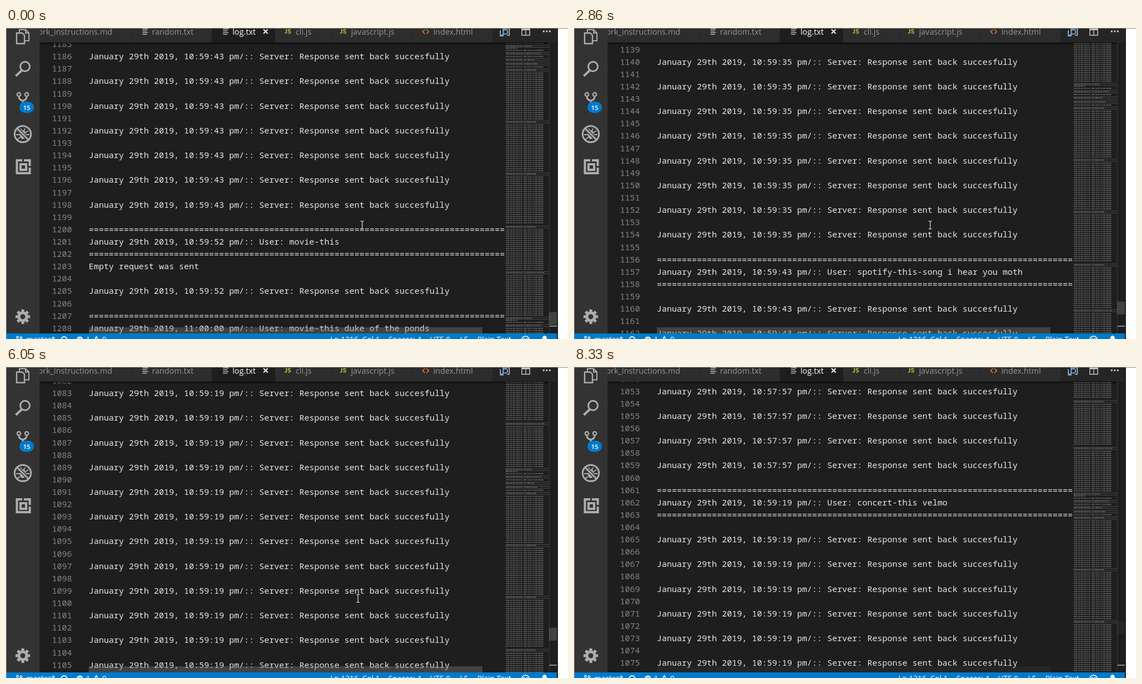
Write an HTML page with a canvas that moves like this. It is 1005 px wide and 557 px high and loops after 8.55 s.

```html
<!DOCTYPE html>
<html>
<head>
<meta charset="utf-8">
<style>
  html, body { margin: 0; width: 100%; height: 100%; overflow: hidden; background: #fff; }
  canvas { display: block; }
</style>
</head>
<body>
<canvas id="stage" width="1005" height="557"></canvas>
<script>
const ctx = document.getElementById('stage').getContext('2d');
const LOOP = 8550, LINE = 22.12, CHAR_MAP = 0.93, MAP_LINE = 1.86, LAST_LINE = 1216;
const NOTCH = 3.3165; // lines per wheel notch
const MONO = '14.95px "Noto Sans Mono", monospace';
const UI = '14.3px "Open Sans", sans-serif';
const ICON = '#adadad';

// [time, wheel notches scrolled so far]
const scrollTrack = [
  [0, 0], [280, 1], [480, 2], [680, 3], [950, 4], [1070, 6],
  [1350, 7], [1560, 8], [1770, 9], [2300, 12], [2860, 14],
  [3880, 17], [4000, 19], [4280, 21], [4560, 23], [4840, 25],
  [5400, 27], [5650, 29], [6050, 31], [6200, 33], [6390, 35],
  [6590, 36], [6780, 38], [6970, 39], [7120, 40]
];
// [time, pointer x, pointer y, shape]
const pointerTrack = [
  [0, 637, 353, 'beam'], [3260, 633, 384, 'beam'], [3380, 629.5, 414.5, 'beam'],
  [7550, 629, 448, 'beam'], [7680, 629, 500, 'beam'], [7810, 628, 541, 'arrow'],
  [7940, 0, 0, 'none']
];
// [first line, time stamp, command, empty request]
const groups = [
  [798, '10:55:58', 'concert-this'], [849, '10:56:31', 'spotify-this-song'],
  [894, '10:56:40', 'spotify-this-song i hear you moth'],
  [938, '10:57:02', 'movie-this', true], [945, '10:57:10', 'movie-this duke of the ponds'],
  [951, '10:57:21', 'do-what-it-says'], [955, '10:57:30', 'movie-this the canal'],
  [961, '10:57:41', 'concert-this velmo'], [1011, '10:57:57', 'concert-this velmo'],
  [1061, '10:59:19', 'concert-this velmo'], [1112, '10:59:35', 'spotify-this-song'],
  [1156, '10:59:43', 'spotify-this-song i hear you moth'],
  [1200, '10:59:52', 'movie-this', true], [1207, '11:00:00', 'movie-this duke of the ponds']
];

const at = (track, t) => track.filter(step => step[0] <= t).pop();

function lineText(n) {
  const i = groups.findLastIndex(g => g[0] <= n);
  if (i < 0 || n > LAST_LINE) return '';
  const [start, time, command, empty] = groups[i];
  const next = i + 1 < groups.length ? groups[i + 1][0] : LAST_LINE + 1;
  const k = n - start, first = empty ? 5 : 4;
  const stamp = `January 29th 2019, ${time} pm/:: `;
  if (k === 0 || k === 2) return '='.repeat(100);
  if (k === 1) return stamp + 'User: ' + command;
  if (k === 3 && empty) return 'Empty request was sent';
  if (k >= first && (k - first) % 2 === 0 && n < next - 1)
    return stamp + 'Server: Response sent back succesfully';
  return '';
}

function rect(x, y, w, h, color) {
  ctx.fillStyle = color;
  ctx.fillRect(x, y, w, h);
}

function text(str, x, y, color, font = UI, align = 'left') {
  ctx.font = font;
  ctx.textAlign = align;
  ctx.fillStyle = color;
  ctx.fillText(str, x, y);
}

function stroke(path, color = ICON, width = 2) {
  ctx.strokeStyle = color;
  ctx.lineWidth = width;
  ctx.stroke(new Path2D(path));
}

function disc(x, y, r, color) {
  ctx.fillStyle = color;
  ctx.beginPath();
  ctx.arc(x, y, r, 0, 7);
  ctx.fill();
}

function ring(x, y, r, width, color = ICON) {
  ctx.strokeStyle = color;
  ctx.lineWidth = width;
  ctx.beginPath();
  ctx.arc(x, y, r, 0, 7);
  ctx.stroke();
}

function clipped(x, y, w, h, draw) {
  ctx.save();
  ctx.beginPath();
  ctx.rect(x, y, w, h);
  ctx.clip();
  draw();
  ctx.restore();
}

function drawEditor(top) {
  clipped(60, 26, 832, 521, () => {
    for (let n = Math.floor(top) - 2; n < top + 24; n++) {
      const y = Math.round(51.2 + (n - top) * LINE) + 5;
      text(n, 118, y, '#858585', MONO, 'right');
      text(lineText(n), 148, y, '#e8e8e8', MONO);
    }
  });
  const shade = ctx.createLinearGradient(0, 26, 0, 31);
  shade.addColorStop(0, 'rgba(0,0,0,.6)');
  shade.addColorStop(1, 'rgba(0,0,0,0)');
  rect(60, 26, 911, 5, shade);
}

function drawMinimap(top) {
  const first = top - 1.6;
  clipped(893, 27, 78, 520, () => {
    for (let n = 780; n <= LAST_LINE; n++) {
      const y = 27 + 0.391 * first + (n - 1 - first) * MAP_LINE;
      if (y < 24 || y > 547) continue;
      const str = lineText(n);
      if (str[0] === '=') { rect(893, y + 0.4, 78, 1, 'rgba(212,212,212,.25)'); continue; }
      for (let i = 0; i < str.length; i++) {
        if (str[i] === ' ') continue;
        const ink = /[,:/.\-]/.test(str[i]) ? 0.15 : 0.3 + str.charCodeAt(i) % 5 * 0.06;
        rect(894 + i * CHAR_MAP, y, CHAR_MAP, 1.4, `rgba(212,212,212,${ink})`);
      }
    }
  });
}

function drawScrollbars(top, alpha, hover) {
  const fill = `rgba(121,121,121,${alpha})`;
  rect(971, 26, 1, 521, '#3b3b3b');
  rect(148, 536, 704, 11, hover ? 'rgba(100,100,100,.7)' : fill);
  rect(971, Math.round(509 + (top - 1186) * 0.407), 14, 23, fill);
  rect(972, 533, 13, 2, '#8a8a8a');
}

function drawTabs() {
  rect(60, 1, 925, 25, '#252526');
  rect(60, 1, 810, 25, '#2d2d2d');
  for (const x of [224, 368, 481, 581, 727, 870]) rect(x, 1, 1, 25, '#252526');
  rect(368, 1, 113, 25, '#1e1e1e');
  const gray = '#969696';
  text('ork_instructions.md', 190, 12, gray, UI, 'right');
  text('random.txt', 261, 12, gray);
  text('log.txt', 405, 12, '#fff');
  text('cli.js', 518, 12, gray);
  text('javascript.js', 617, 12, gray);
  text('index.html', 764, 12, gray);
  for (const x of [244, 388])
    for (let i = 0; i < 4; i++) rect(x, 1 + i * 3.2, i % 2 ? 8 : 10, 1.4, '#b8bcbd');
  for (const x of [498, 597]) text('JS', x, 10, '#cbcb41', 'bold 12px Lato, sans-serif');
  stroke('M749 2.5L745 6.5L749 10.5M752 2.5L756 6.5L752 10.5', '#e37933', 1.6);
  stroke('M460.5 2.5L468 10M468 2.5L460.5 10', '#eee', 2);
  stroke('M889 4V1H900V13H896M884 4V14H890', '#c5c5c5', 1.5);
  ring(893, 7, 4, 1.7, '#75beff');
  stroke('M890 10L885 15', '#75beff', 2);
  stroke('M922.5 1V13H936.5V1M929.5 1V13', '#c5c5c5', 1.5);
  rect(922, 1, 15, 3, '#c5c5c5');
  for (const x of [961.5, 967, 972.5]) disc(x, 6, 1.7, '#c5c5c5');
}

function drawActivityBar() {
  rect(1, 1, 59, 546, '#333');
  stroke('M24 8V3H35L41 9V23H34M35 3V9H41');
  stroke('M19 9H29L33 13V28H19Z', ICON, 2.4);
  ring(34, 69, 8.5, 3);
  stroke('M28 76L17.5 86', ICON, 4);
  for (const x of [23, 37]) ring(x, 119, 3.2, 2.2);
  stroke('M23 122Q23 129 30 130Q37 129 37 122M30 130V137', ICON, 3);
  ctx.fillStyle = '#007acc';
  ctx.beginPath();
  ctx.roundRect(24, 132, 26, 20, 10);
  ctx.fill();
  text('15', 37, 146.5, '#fff', '600 11.5px "Open Sans", sans-serif', 'center');

  ctx.fillStyle = ICON;
  ctx.beginPath();
  ctx.ellipse(30, 191, 5.5, 8, 0, 0, 7);
  ctx.fill();
  stroke('M20 184L25 187M40 184L35 187M18 191H42M20 200L25 196M40 200L35 196M26 180L28 184M34 180L32 184', ICON, 1.8);
  stroke('M19 179L41 201', '#333', 6);
  stroke('M19 179L41 201', ICON, 3);
  ring(30, 190, 14.6, 3);

  stroke('M19.5 237H42.5V260H19.5Z', ICON, 4);
  stroke('M26 244H36V254H26Z', ICON, 4);
  rect(29, 234, 3, 6, '#333');
  rect(39, 247, 6, 3, '#333');

  ring(30, 517, 7, 5);
  for (let i = 0; i < 8; i++) {
    ctx.save();
    ctx.translate(30, 517);
    ctx.rotate(i * Math.PI / 4);
    rect(-2.6, -13, 5.2, 5, ICON);
    ctx.restore();
  }
}

function drawStatusBar() {
  rect(1, 547, 984, 10, '#007acc');
  const put = (str, x) => text(str, x, 563, '#fff', '13.6px "Open Sans", sans-serif');
  put('master*', 36);
  put('1', 143);
  put('0', 172);
  put('Ln 1216, Col 1', 580);
  put('Spaces: 4', 684);
  put('UTF-8', 758);
  put('LF', 812);
  put('Plain Text', 843);
  ring(20.5, 554, 1.8, 1.3, '#fff');
  ring(27, 555, 1.8, 1.3, '#fff');
  ring(104, 558, 5, 1.8, '#fff');
  disc(132, 558, 5.5, '#fff');
  stroke('M129.5 555.5L134.5 560.5M134.5 555.5L129.5 560.5', '#007acc', 1.4);
  stroke('M161.5 552.5L156 563H167Z', '#fff', 1.5);
  ring(929, 559, 7, 1.6, '#fff');
  for (const x of [926.5, 931.5]) disc(x, 556.5, 1.2, '#fff');
  ctx.fillStyle = '#fff';
  ctx.fill(new Path2D('M957 562Q959 560 959 557Q959 551 963 551Q967 551 967 557Q967 560 969 562Z'));
}

function drawPointer(x, y, shape) {
  ctx.save();
  ctx.translate(x, y);
  if (shape === 'beam') {
    stroke('M-3 -7H-1L0 -6L1 -7H3M0 -6V6M-3 7H-1L0 6L1 7H3', '#e4e4e4', 1.2);
  } else if (shape === 'arrow') {
    const path = 'M0 0V15L3.5 12L6 18L8.5 17L6 11H11Z';
    ctx.fillStyle = '#fff';
    ctx.fill(new Path2D(path));
    stroke(path, '#000', 1);
  }
  ctx.restore();
}

function draw(notches, pointer, faded) {
  const top = 1186 - notches * NOTCH;
  const [, x, y, shape] = pointer;
  rect(0, 0, 1005, 557, '#fff');
  rect(0, 0, 987, 557, '#1e1e1e');
  drawEditor(top);
  drawMinimap(top);
  drawScrollbars(top, faded ? 0.09 : 0.4, shape === 'arrow');
  drawTabs();
  drawActivityBar();
  drawStatusBar();
  rect(0, 0, 1005, 1, '#8c8c8c');
  rect(0, 0, 1, 557, '#8c8c8c');
  drawPointer(x, y, shape);
}

let shown = '';
function tick() {
  const t = performance.now() % LOOP;
  const notches = at(scrollTrack, t)[1], pointer = at(pointerTrack, t), faded = t >= 8330;
  const key = [notches, pointer, faded].join();
  if (key !== shown) {
    draw(notches, pointer, faded);
    shown = key;
  }
  requestAnimationFrame(tick);
}
tick();
</script>
</body>
</html>
```
